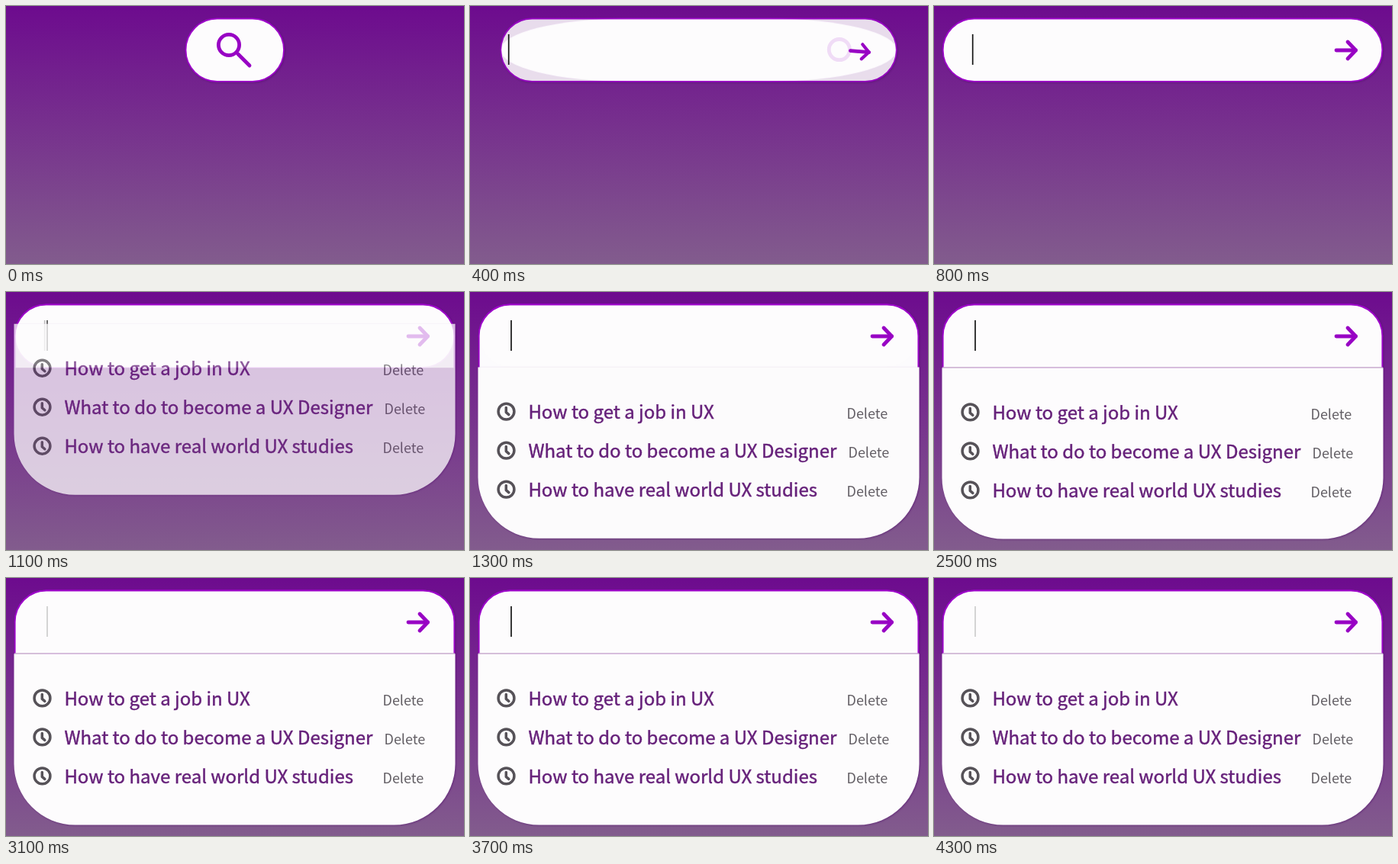
Write an HTML page that moves like this. It is 600 by 338 pixels and loops after 4.4 s.

```html
<!DOCTYPE html>
<html lang="en">
<head>
<meta charset="utf-8">
<title>Expanding search box</title>
<style>
  html, body { margin: 0; width: 100%; height: 100%; overflow: hidden; background: #6f0e8f; }
  svg { display: block; width: 100%; height: 100%; }
  text { font-family: "Noto Sans CJK JP", "Noto Sans CJK SC", "Noto Sans CJK", "Noto Sans", sans-serif; }
  .query { font-size: 24px; fill: #66217a; stroke: #66217a; stroke-width: .45px; }
  .delete { font-size: 18px; fill: #625e64; }
  .icon, .clock { fill: none; stroke-linecap: round; stroke-linejoin: round; }
  .icon { stroke: #9803c4; stroke-width: 4.8; }
  .clock { stroke: #565258; stroke-width: 3.5; }
  .caret { stroke: #151515; stroke-width: 1.7; }
  .white { fill: #fdfcfd; }
  .edge { stroke: #9d05c9; stroke-width: 1.8; }
  .shadow { filter: drop-shadow(1.5px 1.5px 1px rgba(70, 0, 100, .4)); }
</style>
</head>
<body>
<svg viewBox="0 0 600 338" preserveAspectRatio="none">
  <defs>
    <linearGradient id="sky" x2="0" y2="1">
      <stop offset="0" stop-color="#6d0b8e"/>
      <stop offset="1" stop-color="#825c8d"/>
    </linearGradient>
    <clipPath id="window"><rect y="16" width="600" height="322"/></clipPath>
  </defs>
  <rect width="600" height="338" fill="url(#sky)"/>

  <g class="shadow">
    <rect id="oldPill" class="white edge" y="16.5" height="82.3" ry="41"/>
    <rect id="newPill" class="white edge" y="16.5" height="82.3" rx="41"/>
    <path id="header" class="white edge" d="M11.7 99.3V57.5A41 41 0 0 1 52.7 16.5H546.3A41 41 0 0 1 587.3 57.5V99.3"/>
  </g>

  <circle id="lens" class="icon" r="13.6"/>
  <g id="arrow" class="icon">
    <path id="shaft"/>
    <path id="head" d="M-10.5 -11L0 0L-10.5 11"/>
  </g>
  <path id="firstCaret" class="caret" d="M50.7 37V77"/>
  <path id="caret" class="caret" d="M54 37V77"/>

  <g clip-path="url(#window)">
    <g id="panel">
      <path class="white shadow" d="M10.5 99.3H588.5V243.5A80 80 0 0 1 508.5 323.5H90.5A80 80 0 0 1 10.5 243.5Z"/>
      <g id="rows"></g>
    </g>
  </g>
  <path id="divider" d="M11 98.8H588" stroke="#c3a3ca"/>
</svg>
<script>
const LOOP = 4400;
const EXPAND = 50, DROP = 823, LENGTH = 500;
const PANEL_HEIGHT = 224;
const $ = id => document.getElementById(id);
const clamp = v => Math.min(1, Math.max(0, v));
const mix = (a, b, p) => a + (b - a) * p;
const set = (id, attrs) => {
  for (const key in attrs) $(id).setAttribute(key, attrs[key]);
};

// cubic-bezier(0, 0, .58, 1)
function easeOut(t) {
  if (t <= 0 || t >= 1) return clamp(t);
  let low = 0, high = 1, u;
  for (let i = 0; i < 20; i++) {
    u = (low + high) / 2;
    if (1.74 * u * u * (1 - u) + u ** 3 < t) low = u; else high = u;
  }
  return u * u * (3 - 2 * u);
}

const rows = [
  { text: "How to get a job in UX", y: 157.4, deleteX: 493.5 },
  { text: "What to do to become a UX Designer", y: 208.4, deleteX: 495.5 },
  { text: "How to have real world UX studies", y: 259.4, deleteX: 493.5 }
];
$("rows").innerHTML = rows.map(({ text, y, deleteX }) => `
  <g class="clock"><circle cx="47.5" cy="${y}" r="10.4"/>
  <path d="M47.3 ${y - 5}V${y + 1}L50.8 ${y + 4}"/></g>
  <text class="query" x="76.4" y="${y + 9.5}">${text}</text>
  <text class="delete" x="${deleteX}" y="${y + 9.6}">Delete</text>`).join("");

function drawSearch(p) {
  const x = mix(235.5, 11.7, p), width = mix(128.5, 575.6, p);
  set("oldPill", { x, width, rx: 41 * width / 128.5, "stroke-opacity": 1 - p });
  set("newPill", { x, width, opacity: p });
  set("lens", { cx: mix(292, 512, p), cy: mix(51, 58, p), opacity: 1 - p });

  const tail = [mix(304, 527, p), mix(63, 58, p)];
  const tip = [mix(319, 552.5, p), mix(78, 58, p)];
  const angle = Math.atan2(tip[1] - tail[1], tip[0] - tail[0]) * 180 / Math.PI;
  set("shaft", { d: `M${tail}L${tip}` });
  set("head", { transform: `translate(${tip}) rotate(${angle}) scale(${p})` });
}

function drawPanel(p) {
  set("header", { opacity: p });
  set("panel", { opacity: p, transform: `translate(0 ${PANEL_HEIGHT * (p - 1)})` });
}

function draw(time) {
  const open = easeOut((time - EXPAND) / LENGTH);
  const drop = easeOut((time - DROP) / LENGTH);
  drawSearch(open);
  drawPanel(drop);
  const blink = 0.6 + 0.4 * Math.cos((time - 1300) / 1200 * 2 * Math.PI);
  set("firstCaret", { opacity: clamp((open - 0.6) / 0.25) * (1 - drop) });
  set("caret", { opacity: time < DROP + LENGTH ? drop : blink });
  set("divider", { opacity: time < 1350 ? 0 : 1 });
}

const start = performance.now();
function tick() {
  draw((performance.now() - start) % LOOP);
  requestAnimationFrame(tick);
}
tick();
</script>
</body>
</html>
```
